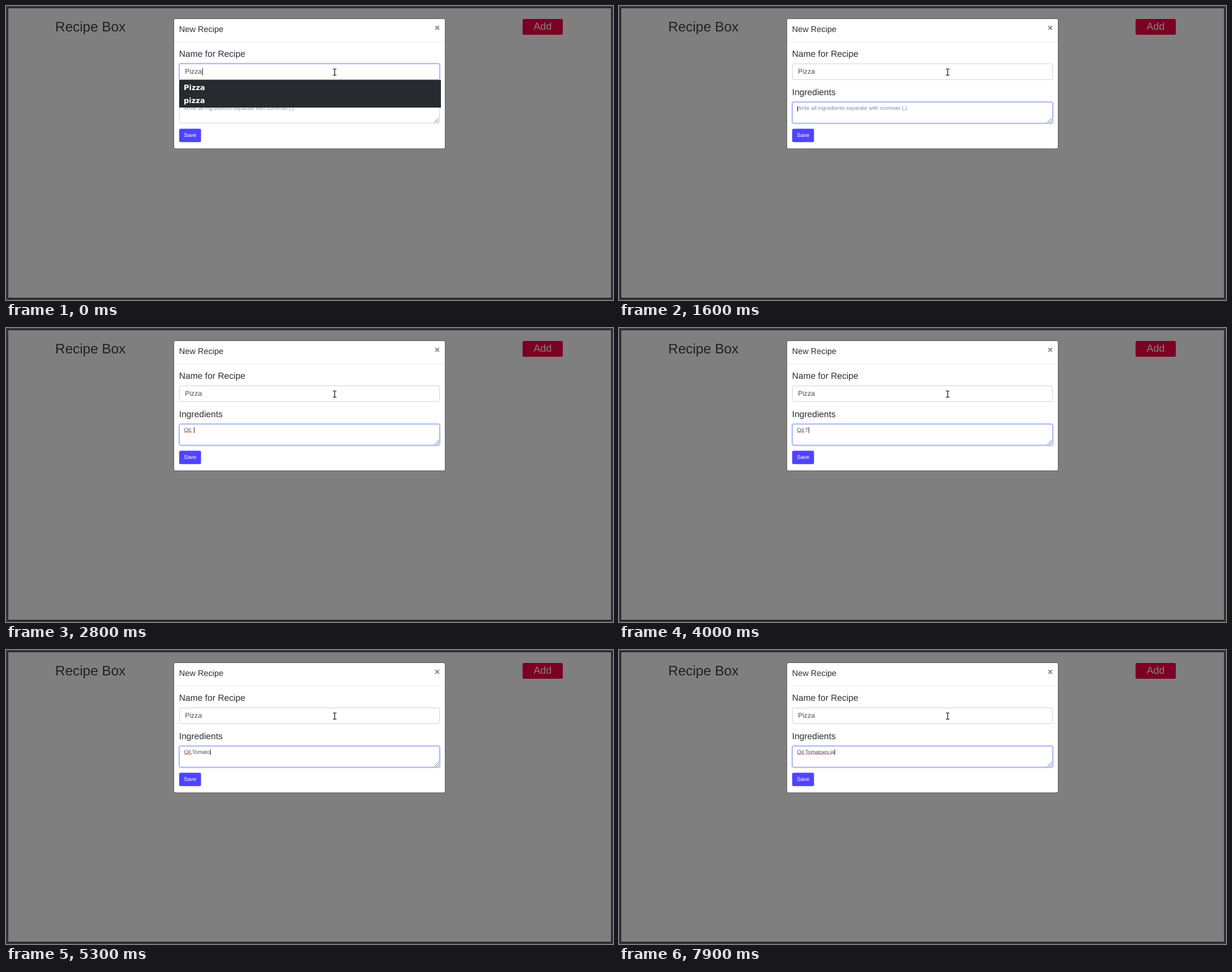
Write an HTML page that moves like this. It is 1076x521 px and loops after 8 s.

```html
<!DOCTYPE html>
<html lang="en">
<head>
<meta charset="utf-8">
<title>New Recipe</title>
<style>
  html, body { margin: 0; width: 100%; height: 100%; overflow: hidden; background: #3a3b3f; }
  svg { display: block; width: 1076px; height: 521px; }
  text { font-family: "Liberation Sans", Arial, sans-serif; text-rendering: geometricPrecision; fill: #2b2f33; }
  .label { font-size: 15.65px; }
  .small { font-size: 9.65px; fill: #495057; }
  #hint { fill: #868c93; }
  .option { font: bold 13px "DejaVu Sans", sans-serif; fill: #fff; }
  .field { fill: #fff; stroke: #ced4da; }
  .ring { fill: none; stroke: #cfd6ff; stroke-width: 4.2; visibility: hidden; }
  .focus .ring { visibility: visible; }
  .focus .field { stroke: #90a0fb; }
  .caret { fill: #222; }
  .wave { fill: none; stroke: #e0443e; stroke-width: .9; }
</style>
</head>
<body>
<svg viewBox="0 0 1076 521">
  <rect width="1076" height="521" fill="#3a3b3f"/>
  <rect x="2" y="2" width="1073" height="517.5" fill="#27282b"/>
  <rect x="4" y="4" width="1068.5" height="513" fill="#7f7f7f"/>

  <text x="87.3" y="45" font-size="24.4" style="fill:#1f2122">Recipe Box</text>
  <rect x="915.7" y="23" width="71.3" height="28" rx="2.5" fill="#7b0023"/>
  <text x="951.3" y="42" font-size="18" text-anchor="middle" style="fill:#858083">Add</text>

  <rect x="297.5" y="22.5" width="481" height="230.5" rx="3" fill="#fff" stroke="#555"/>
  <text x="306.8" y="46" font-size="14.6">New Recipe</text>
  <text x="764.5" y="44.3" font-size="16" font-weight="bold" text-anchor="middle" style="fill:#7b7b7b">×</text>
  <rect x="298" y="63" width="480" height="1" fill="#e7e9eb"/>

  <text class="label" x="306.8" y="90">Name for Recipe</text>
  <g id="name">
    <rect class="ring" x="307.5" y="102.5" width="461" height="28" rx="2.5"/>
    <rect class="field" x="307.5" y="102.5" width="461" height="28" rx="2.5"/>
    <text x="317.2" y="120" font-size="12.3" style="fill:#495057">Pizza</text>
  </g>

  <text class="label" x="306.8" y="158">Ingredients</text>
  <g id="list">
    <rect class="ring" x="307.5" y="170.5" width="461" height="37" rx="2.5"/>
    <rect class="field" x="307.5" y="170.5" width="461" height="37" rx="2.5"/>
    <path d="M759.5 206.5l7.5 -7.5M763.5 206.5l3.5 -3.5" stroke="#555" stroke-width=".9"/>
    <text id="hint" class="small" x="315.6" y="184">Write all ingredients separate with commas (,)</text>
    <text id="typed" class="small" x="315.6" y="184"></text>
    <path id="wave1" class="wave"/>
    <path id="wave2" class="wave"/>
  </g>

  <rect x="307" y="217.5" width="38.7" height="23.7" rx="2.5" fill="#4f44ff"/>
  <text x="326.3" y="232.2" font-size="9.75" text-anchor="middle" style="fill:#fff">Save</text>

  <g id="menu">
    <rect x="307" y="131" width="464" height="49" fill="#272b2f"/>
    <text class="option" x="315" y="149">Pizza</text>
    <text class="option" x="315" y="172">pizza</text>
  </g>
  <rect id="caret" class="caret" width="1"/>

  <path d="M579.5 111.5h2.2l.8 .7l.8 -.7h2.2M582.5 112v9.5M579.5 122.5h2.2l.8 -.7l.8 .7h2.2" fill="none" stroke="#bbb" transform="translate(.8 .8)"/>
  <path d="M579.5 111.5h2.2l.8 .7l.8 -.7h2.2M582.5 112v9.5M579.5 122.5h2.2l.8 -.7l.8 .7h2.2" fill="none" stroke="#1a1a1a" stroke-width="1.1"/>
</svg>
<script>
const LOOP = 8000;
const $ = id => document.getElementById(id);

// start time, typed text, caret x (0 = blinked off)
const steps = [
  [0, '', 348], [500, '', 316], [1000, '', 0], [1600, '', 316],
  [1800, 'O', 323], [2000, 'Oi', 325], [2200, 'Oil', 327],
  [2500, 'Oil,', 330], [2800, 'Oil, ', 333], [3400, 'Oil, ', 0],
  [4000, 'Oil,T', 336], [4200, 'Oil,To', 341], [4500, 'Oil,Tom', 349],
  [4800, 'Oil,Toma', 353], [5100, 'Oil,Tomat', 356], [5300, 'Oil,Tomato', 362],
  [5400, 'Oil,Tomatoe', 367], [5900, 'Oil,Tomatoes', 372],
  [6100, 'Oil,Tomatoes,', 375], [6700, 'Oil,Tomatoes,', 0], [7300, 'Oil,Tomatoes,', 375],
  [7800, 'Oil,Tomatoes,j', 377], [7900, 'Oil,Tomatoes,ja', 382]
];

function wave(x, end) {
  let d = `M${x} 185.5`;
  for (let up = true; x + 2 <= end; x += 2, up = !up) d += `l2 ${up ? -1.5 : 1.5}`;
  return d;
}
$('wave1').setAttribute('d', wave(316, 328));
$('wave2').setAttribute('d', wave(330.5, 372.5));

const show = (id, on) => $(id).setAttribute('visibility', on ? 'visible' : 'hidden');
let last;

function draw() {
  const t = performance.now() % LOOP;
  const step = steps.findLast(s => s[0] <= t);
  if (step !== last) {
    last = step;
    const [at, text, x] = step;
    const naming = at < 500;
    $('name').classList.toggle('focus', naming);
    $('list').classList.toggle('focus', !naming);
    show('menu', naming);
    show('hint', !text);
    $('typed').textContent = text;
    show('wave1', text.length > 3);
    show('wave2', text.length > 12);
    show('caret', x);
    $('caret').setAttribute('x', x);
    $('caret').setAttribute('y', naming ? 110 : text ? 176 : 177);
    $('caret').setAttribute('height', naming ? 13 : 10);
  }
  requestAnimationFrame(draw);
}
draw();
</script>
</body>
</html>
```
